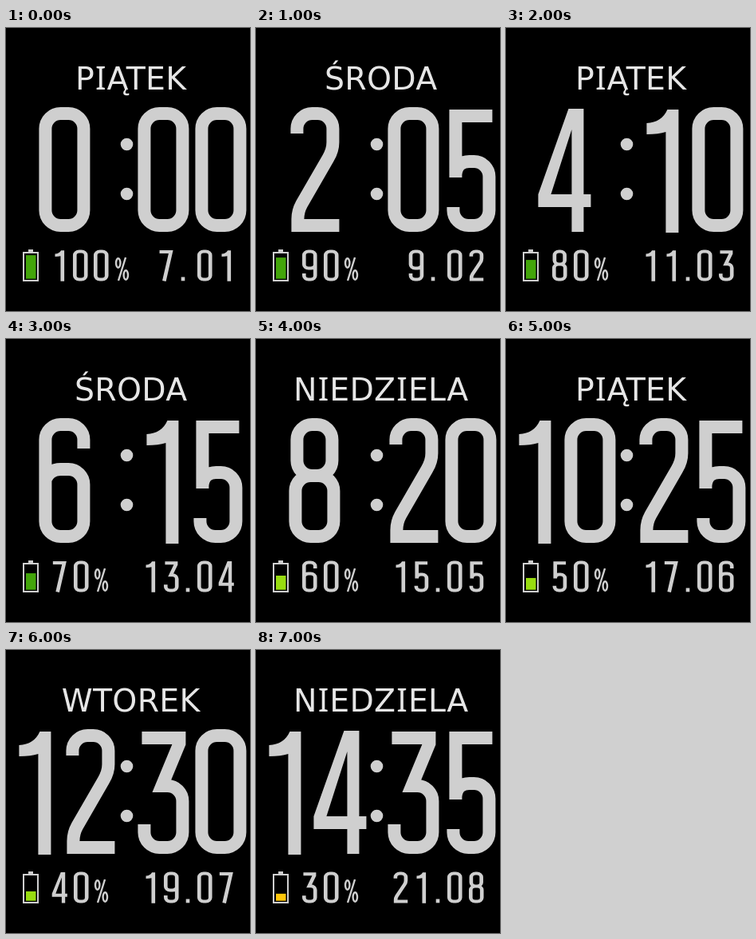
An HTML page for the animation above (8 s loop, 306 by 354 pixels).

```html
<!DOCTYPE html>
<html lang="pl">
<head>
<meta charset="utf-8">
<title>Zegar</title>
<style>
  html, body { margin: 0; width: 100%; height: 100%; overflow: hidden; background: #000; }
  svg { display: block; }
  #day { font: 39.4px "DejaVu Sans", sans-serif; letter-spacing: .3px; fill: #e6e6e6; text-anchor: middle; }
  #day .i { font: 40px "Noto Sans", sans-serif; letter-spacing: 1px; }
  .line { fill: none; stroke: #cfcfcf; stroke-width: 16; }
  .solid { fill: #cfcfcf; fill-rule: evenodd; }
  .thin { fill: none; stroke: #cfcfcf; stroke-width: 2.4; }
</style>
</head>
<body>
<svg width="306" height="354" viewBox="0 0 306 354">
  <text id="day" x="156.7" y="77"></text>
  <g class="solid">
    <circle cx="151.5" cy="145.5" r="7.8"/>
    <circle cx="151.5" cy="207.5" r="7.8"/>
    <path d="M28 277h6v3h7v37h-20v-37h7zM23 282v33h16v-33z"/>
  </g>
  <rect id="level" x="25" width="12.5"/>
  <g id="face"></g>
</svg>
<script>
const DAYS = ["NIEDZIELA", "PONIEDZIAŁEK", "WTOREK", "ŚRODA", "CZWARTEK", "PIĄTEK", "SOBOTA"];
const STEP = 1000, STEPS = 8;

const box = (x, y, w, h, r = 19) =>
  `M${x} ${y + r}a${r} ${r} 0 0 1 ${r} ${-r}h${w - 2 * r}a${r} ${r} 0 0 1 ${r} ${r}` +
  `v${h - 2 * r}a${r} ${r} 0 0 1 ${-r} ${r}h${2 * r - w}a${r} ${r} 0 0 1 ${-r} ${-r}z`;

// Digit shapes in a 72 x 156 cell
const DIGITS = [
  box(12, 8, 48, 140),
  "M51 157H35V31Q26 34 11 34V20Q30 19 37 3H51Z",
  "M14 33V27A19 19 0 0 1 33 8H40A19 19 0 0 1 59 27V44Q59 54 53 64L20 121Q15 130 15 140V148H67",
  "M9 11H56V18L34 71H41A19 19 0 0 1 60 90V129A19 19 0 0 1 41 148H31A19 19 0 0 1 12 129V119",
  "M60 2H41L3 109V125H45V156H60V125H69V109H60ZM45 28V109H19Z",
  "M63 11H17V88M17 84Q19 68 34 68H40A19 19 0 0 1 59 87V129A19 19 0 0 1 40 148H33A19 19 0 0 1 14 129V125",
  "M60 38V27A19 19 0 0 0 41 8H31A19 19 0 0 0 12 27V129A19 19 0 0 0 31 148H41A19 19 0 0 0 60 129V83A19 19 0 0 0 41 64H31Q17 64 12 77",
  "M7 10H56L27 156",
  box(14, 8, 44, 64) + box(12, 72, 48, 76),
  "M12 118V129A19 19 0 0 0 31 148H41A19 19 0 0 0 60 129V27A19 19 0 0 0 41 8H31A19 19 0 0 0 12 27V73A19 19 0 0 0 31 92H41Q55 92 60 79"
];

const digit = (d, transform) =>
  `<path class="${d == 1 || d == 4 ? "solid" : "line"}" d="${DIGITS[d]}" transform="${transform}"/>`;

function big(text, mid) {
  const widths = [...text].map(d => d == 1 ? 64 : 72);
  let x = mid - widths.reduce((a, b) => a + b) / 2;
  return [...text].map((d, i) => {
    const out = digit(d, `translate(${x} 99)`);
    x += widths[i];
    return out;
  }).join("");
}

const small = (text, mid, gap) => [...text].map((d, i) =>
  digit(d, `translate(${mid + i * gap - 11.2 + (d == 1 ? 1.5 : 0)} 277.5) scale(.29 .25)`)).join("");

const percent = x => `<g class="thin" transform="translate(${x} 286)">
  <ellipse cx="3.7" cy="8" rx="2.7" ry="5.8"/><ellipse cx="13.3" cy="23" rx="2.7" ry="5.8"/>
  <path d="M13 1L4 30"/></g>`;

const dot = x => `<rect class="solid" x="${x - 2.3}" y="311.5" width="4.6" height="4.8"/>`;
const pad = n => String(n).padStart(2, "0");
const byId = id => document.getElementById(id);

function draw(n) {
  const date = new Date(2022, n, 7 + 2 * n, 2 * n, 5 * n);
  const charge = 100 - 10 * n, chargeText = String(charge);
  const day = String(date.getDate()), wide = day.length > 1;

  byId("day").innerHTML = DAYS[date.getDay()].replace(/I/g, '<tspan class="i" dx="1">I</tspan>');

  const level = byId("level"), height = charge * 0.295;
  level.setAttribute("y", 313.7 - height);
  level.setAttribute("height", height);
  level.setAttribute("fill", charge > 66 ? "#43a50a" : charge > 33 ? "#98dc10" : "#ffc60a");

  byId("face").innerHTML =
    big(String(date.getHours()), 73.4) +
    big(pad(date.getMinutes()), 233.4) +
    small(chargeText, 68, charge == 100 ? 26 : 27) +
    percent(charge == 100 ? 137 : 111) +
    small(day, wide ? 182 : 201.7, 26) +
    dot(wide ? 228 : 222) +
    small(pad(date.getMonth() + 1), 250, 27);
}

let shown = -1;
function tick() {
  const n = Math.floor(performance.now() / STEP) % STEPS;
  if (n !== shown) draw(shown = n);
  requestAnimationFrame(tick);
}
tick();
</script>
</body>
</html>
```
